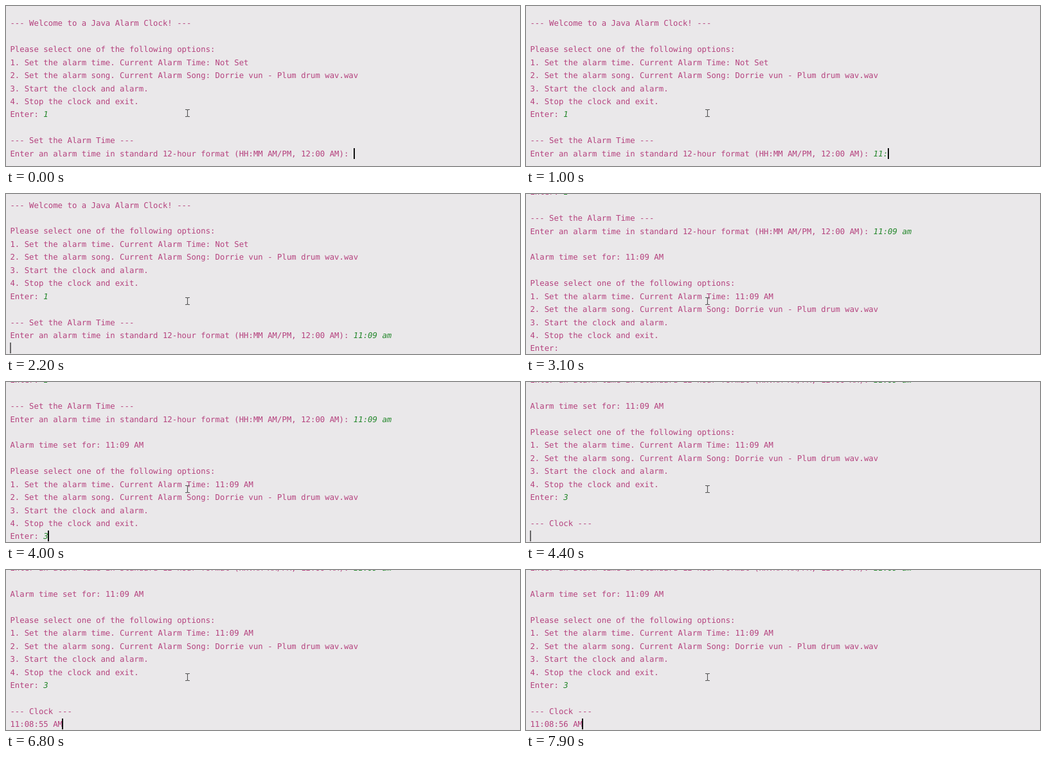
These frames come from a looping animation (800 px wide and 251 px high, 8000 ms). An HTML page:

```html
<!DOCTYPE html>
<html lang="en">
<head>
<meta charset="utf-8">
<title>Alarm clock console</title>
<style>
html, body { margin: 0; width: 100%; height: 100%; overflow: hidden; background: #eae8ea; }
#page { position: absolute; left: 6.4px; top: 17.4px; }
pre {
  margin: 0; color: #b5427e;
  font: 12.34px/20.43px "DejaVu Sans Mono", monospace;
  text-rendering: geometricPrecision; font-variant-ligatures: none;
}
pre i { color: #22862a; }
#caret { position: absolute; width: 2px; height: 17px; background: #111; }
svg { position: absolute; left: 277px; top: 161px; }
</style>
</head>
<body>
<div id="page"><pre id="text"></pre><div id="caret"></div></div>
<svg width="11" height="14" fill="none" stroke="#555" stroke-width="1.1">
  <path d="M2 1.5H4.5L5.5 2.5L6.5 1.5H9M5.5 2.5V11.5M2 12.5H4.5L5.5 11.5L6.5 12.5H9"/>
</svg>
<script>
const LOOP = 8000, LINE = 20.43, CHAR = 7.43, BLINK = 500;
const page = document.getElementById("page");
const text = document.getElementById("text");
const caret = document.getElementById("caret");

const menu = alarm => `Please select one of the following options:
1. Set the alarm time. Current Alarm Time: ${alarm}
2. Set the alarm song. Current Alarm Song: Dorrie vun - Plum drum wav.wav
3. Start the clock and alarm.
4. Stop the clock and exit.
Enter: `;
const key = c => `<i>${c}</i>`;

// Each event appends to the console at its time.
const events = [
  [0, `--- Welcome to a Java Alarm Clock! ---\n\n${menu("Not Set")}${key(1)}

--- Set the Alarm Time ---
Enter an alarm time in standard 12-hour format (HH:MM AM/PM, 12:00 AM): `],
  ...[500, 700, 1000, 1300, 1500, 1700, 1900, 2000].map((t, k) => [t, key("11:09 am"[k])]),
  [2200, "\n"],
  [2500, `\nAlarm time set for: 11:09 AM\n\n${menu("11:09 AM")}`],
  [3700, key(3)],
  [4100, "\n\n--- Clock ---\n"]
];
const CLOCK_START = 4500;
let shown = "";

function draw(now) {
  const t = now % LOOP;
  const past = events.filter(e => e[0] <= t);
  let last = past[past.length - 1][0];
  let html = past.map(e => e[1]).join("");
  if (t >= CLOCK_START) {
    const ticks = Math.floor((t - CLOCK_START) / 1000);
    last = CLOCK_START + ticks * 1000;
    html += `11:08:${53 + ticks} AM`;
  }
  if (html !== shown) text.innerHTML = shown = html;

  const lines = text.textContent.split("\n");
  const row = lines.length - 1, col = lines[row].length;
  const scroll = Math.max(0, row * LINE - 214.9);
  page.style.top = 17.4 - scroll + "px";
  caret.style.left = col * CHAR - 0.7 + "px";
  caret.style.top = row * LINE + 1 + "px";
  caret.style.opacity = col ? 1 : 0.6; // partly cut by the pane edge
  caret.style.visibility = Math.floor((t - last) / BLINK) % 2 ? "hidden" : "visible";
  requestAnimationFrame(() => draw(performance.now()));
}
draw(performance.now());
</script>
</body>
</html>
```
